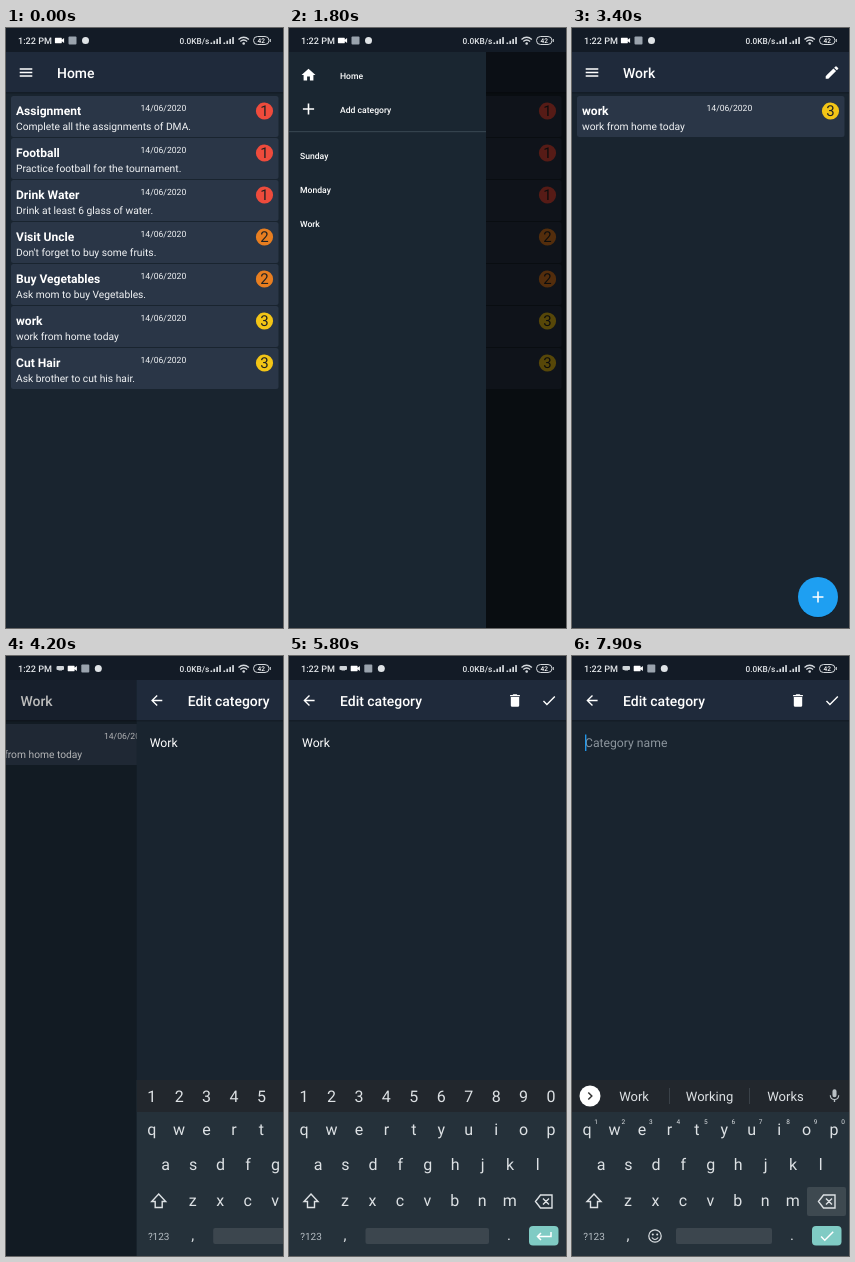
Write an HTML page that moves like this. It is 277 px wide and 600 px high and loops after 8000 ms.

```html
<!DOCTYPE html>
<html lang="en">
<head>
<meta charset="utf-8">
<title>To-do app demo</title>
<style>
html, body { margin: 0; width: 100%; height: 100%; overflow: hidden; background: #19242f; }
svg { display: block; width: 100%; height: 100%; font-family: Roboto, "Noto Sans", sans-serif; text-rendering: geometricPrecision; }
</style>
</head>
<body>
<svg id="stage" viewBox="0 0 277 600"></svg>
<script>
const LOOP = 8000, W = 277, DRAWER = 197;
const BG = '#19242f', BAR = '#1f2a3b', CARD = '#2a3647', KEY = '#dde1e4';

// Markup helpers
const rect = (x, y, w, h, fill, r = 0, extra = '') =>
  `<rect x="${x}" y="${y}" width="${w}" height="${h}" rx="${r}" fill="${fill}" ${extra}/>`;
const circle = (x, y, r, fill) => `<circle cx="${x}" cy="${y}" r="${r}" fill="${fill}"/>`;
const text = (s, x, y, size, { fill = '#fff', weight = 400, anchor = 'start', id = '' } = {}) =>
  `<text x="${x}" y="${y}" font-size="${size}" font-weight="${weight}" fill="${fill}" text-anchor="${anchor}" ${id && `id="${id}"`}>${s}</text>`;
const line = (d, color = '#fff', w = 1.5) =>
  `<path d="${d}" fill="none" stroke="${color}" stroke-width="${w}"/>`;
// Icon on a 24-unit grid centred at x, y
const icon = (d, x, y, scale = 0.7, fill = '#fff') =>
  `<path transform="translate(${x} ${y}) scale(${scale}) translate(-12 -12)" d="${d}" fill="${fill}"/>`;
const group = (id, body) => `<g id="${id}">${body}</g>`;
const mid = (s, x, y, size, fill = KEY) => text(s, x, y, size, { fill, anchor: 'middle' });

const ICONS = {
  menu: 'M3 18h18v-2H3zM3 13h18v-2H3zM3 6v2h18V6z',
  pencil: 'M3 17.2V21h3.8L17.8 9.9l-3.7-3.7zM20.7 7a1 1 0 0 0 0-1.4l-2.3-2.3a1 1 0 0 0-1.4 0l-1.9 1.8 3.8 3.8z',
  home: 'M10 20v-6h4v6h5v-8h3L12 3 2 12h3v8z',
  trash: 'M6 19a2 2 0 0 0 2 2h8a2 2 0 0 0 2-2V7H6zM19 4h-3.5l-1-1h-5l-1 1H5v2h14z',
  back: 'M20 11H7.8l5.6-5.6L12 4l-8 8 8 8 1.4-1.4L7.8 13H20z',
  check: 'M9 16.2 4.8 12l-1.4 1.4L9 19 21 7l-1.4-1.4z',
  plus: 'M19 13h-6v6h-2v-6H5v-2h6V5h2v6h6z',
  camera: 'M17 10.5V7a1 1 0 0 0-1-1H3a1 1 0 0 0-1 1v10a1 1 0 0 0 1 1h13a1 1 0 0 0 1-1v-3.5l5 4v-11z',
  mic: 'M12 14a3 3 0 0 0 3-3V5a3 3 0 0 0-6 0v6a3 3 0 0 0 3 3zM17.3 11a5.3 5.3 0 0 1-10.600 0H5a7 7 0 0 0 6 6.9V21h2v-3.1a7 7 0 0 0 6-6.9z',
};

const tasks = [
  ['Assignment', 'Complete all the assignments of DMA.', 1],
  ['Football', 'Practice football for the tournament.', 1],
  ['Drink Water', 'Drink at least 6 glass of water.', 1],
  ['Visit Uncle', "Don't forget to buy some fruits.", 2],
  ['Buy Vegetables', 'Ask mom to buy Vegetables.', 2],
  ['work', 'work from home today', 3],
  ['Cut Hair', 'Ask brother to cut his hair.', 3],
];
const badgeColors = ['', '#ee4b3c', '#e87e20', '#f3c516'];

const card = ([title, note, level], i) => {
  const y = 68 + 42 * i;
  return rect(5, y, 267.5, 41, CARD, 2.5) +
    text(title, 10, y + 19, 12.05, { weight: 700 }) +
    text(note, 10, y + 33.7, 10.25, { fill: '#f1f3f5' }) +
    text('14/06/2020', 134.5, y + 15.2, 8.6, { fill: '#f1f3f5' }) +
    circle(258.5, y + 15, 8.6, badgeColors[level]) +
    mid(level, 258.5, y + 20.3, 15, '#222');
};

const page = (title, lead) => rect(0, 0, W, 600, BG) + rect(0, 64, W, 1.5, '#141d27') +
  rect(0, 24, W, 40, BAR) + text(title, 51, 49.8, 13.95, { weight: 500 }) + icon(ICONS[lead], 20, 44.5);

const homePage = page('Home', 'menu') + tasks.map(card).join('');
const workPage = page('Work', 'menu') + icon(ICONS.pencil, 260, 44.5) + card(tasks[5], 0) +
  circle(246, 570, 20, '#12202c') + circle(246, 569, 20, '#1e9ff2') + icon(ICONS.plus, 246, 569, 0.78);

const item = (s, x, y) => text(s, x, y, 8.6, { weight: 500 });
const drawer = rect(0, 0, DRAWER, 600, '#1a2631') +
  icon(ICONS.home, 19.5, 47) + item('Home', 51, 50.5) +
  icon(ICONS.plus, 19.5, 81, 0.8) + item('Add category', 51, 84.5) +
  rect(0, 103, DRAWER, 1.2, '#34424d') +
  ['Sunday', 'Monday', 'Work'].map((s, i) => item(s, 11, 130.5 + 34 * i)).join('');

// Keyboard
const row = (keys, x, y, size = 16) =>
  [...keys].map((k, i) => mid(k, x + 27.45 * i, y, size)).join('');
const digits = '1234567890';
const enterKey = rect(240, 570, 29.5, 19.5, '#80cbc4', 4);
const spaceKey = x => rect(x, 572, 200 - x, 16, '#3c464e', 2);
const plainKeys = row(digits, 15, 446) + spaceKey(76.5) + enterKey +
  line('M262 576v4.5h-13M252 577l-3.5 3.5 3.5 3.5');
const typingKeys = circle(18, 440, 10.5, '#fff') + line('M16.3 436.5l3.5 3.5-3.5 3.5', '#333') +
  rect(97, 432, 1, 16, '#3a4148') + rect(177, 432, 1, 16, '#3a4148') +
  mid('Work', 62, 445, 13) + mid('Working', 137.5, 445, 13) + mid('Works', 213.5, 445, 13) +
  icon(ICONS.mic, 262.5, 440, 0.68, '#b9c0c5') + row(digits, 24, 468, 6.5) +
  `<circle cx="83" cy="580" r="6.2" fill="none" stroke="${KEY}" stroke-width="1.2"/>` +
  circle(80.8, 578.5, 1, KEY) + circle(85.2, 578.5, 1, KEY) + line('M79.8 581.5q3.2 4 6.4 0', KEY, 1.2) +
  spaceKey(104) + enterKey + icon(ICONS.check, 255, 580, 0.75);
const keyboard = rect(0, 424, W, 176, '#25313a') + rect(0, 424, W, 32, '#22272d') +
  group('deleteGlow', rect(235, 531, 39, 29, '#3e4950', 2)) +
  row('qwertyuiop', 15, 479) + row('asdfghjkl', 29, 514) + row('zxcvbnm', 56, 549.5) +
  line('M22 538l7 7.5h-3.5v6h-7v-6h-3.5z', KEY, 1.4) +
  line('M246.5 545.5l5-6.5h11.5v13h-11.5zM254 542.5l6 6M260 542.5l-6 6', KEY, 1.4) +
  mid('?123', 22, 583.5, 10, '#b4bcc2') + mid(',', 56, 584, 15) + mid('.', 220, 584, 15) +
  group('plainKeys', plainKeys) + group('typingKeys', typingKeys);

const editPage = page('Edit category', 'back') +
  icon(ICONS.trash, 226, 44.5) + icon(ICONS.check, 260, 44.5) +
  text('Category name', 13, 91, 12.2, { fill: '#8c959d', id: 'hint' }) +
  text('Work', 13, 91, 12.2, { id: 'field' }) +
  rect(0, 78.5, 1.4, 16.5, '#2196e8', 0, 'id="caret"') + keyboard;

// Status bar
const bars = x => [0, 1, 2, 3].map(i => rect(x + 2.9 * i, 14.5 - 1.8 * i, 1.7, 1.5 + 1.8 * i, '#d5d9dd')).join('');
const statusBar = rect(0, 0, W, 24, '#131b26') +
  text('1:22 PM', 12, 16, 9.1, { weight: 500, fill: '#e4e7ea' }) +
  group('keyIcon', rect(50.5, 10, 7.5, 4, '#cfd4d8', 1) + rect(52.5, 13, 3.5, 1.5, '#cfd4d8')) +
  group('notices', icon(ICONS.camera, 53.5, 12.5, 0.46) + rect(62.5, 8.5, 8, 8, '#9aa3ad', 1) +
    circle(79.5, 12.5, 3.5, '#dfe3e6')) +
  text('0.0KB/s', 173.5, 16, 8.3, { weight: 500, fill: '#e4e7ea' }) + bars(204.5) + bars(217.5) +
  line('M232.5 11.5q5.2-4.6 10.4 0M234.3 13.5q3.4-3 6.8 0', '#d5d9dd', 1.3) +
  circle(237.7, 15.5, 1.3, '#d5d9dd') +
  `<rect x="247.5" y="8.5" width="15.5" height="8" rx="4" fill="none" stroke="#d5d9dd"/>` +
  rect(263.8, 11, 1, 3, '#d5d9dd') +
  text('42', 255.2, 15, 6.5, { weight: 500, anchor: 'middle' });

stage.innerHTML =
  group('under', group('home', homePage) + group('work', workPage)) +
  rect(0, 0, W, 600, '#000', 0, 'id="dim"') + group('drawer', drawer) +
  group('edit', editPage) + statusBar;

const $ = id => document.getElementById(id);
const show = (id, on) => $(id).setAttribute('display', on ? 'inline' : 'none');
const shift = (id, x) => $(id).setAttribute('transform', `translate(${x} 0)`);
const easeOut = (t, from, to, power) =>
  1 - (1 - Math.min(1, Math.max(0, (t - from) / (to - from)))) ** power;

function draw(time) {
  const t = Math.floor(time % LOOP / 100) * 100;
  const open = easeOut(t, 1000, 1500, 2.14) - easeOut(t, 2400, 2900, 2.14);
  const slide = easeOut(t, 4100, 4700, 4.12);
  const editing = slide > 0, typing = t >= 6600;

  show('home', t < 2500);
  show('work', t >= 2500);
  shift('under', -W / 4 * slide);
  $('dim').setAttribute('opacity', 0.64 * open ** 1.7 + 0.5 * slide);
  show('drawer', open > 0);
  shift('drawer', DRAWER * (open - 1));
  show('edit', editing);
  shift('edit', W * (1 - slide));

  const erased = t < 7100 ? 0 : t < 7400 ? 1 : Math.min(4, 2 + (t - 7400) / 100);
  const value = 'Work'.slice(0, 4 - erased);
  $('field').textContent = value;
  show('hint', !value);
  show('caret', typing);
  if (typing) $('caret').setAttribute('x', 13 + (value ? $('field').getComputedTextLength() : 0));
  show('deleteGlow', t >= 7100);
  show('plainKeys', !typing);
  show('typingKeys', typing);

  show('keyIcon', editing);
  shift('notices', editing ? 12.8 : 0);
}

const start = performance.now();
(function tick() {
  draw(performance.now() - start);
  requestAnimationFrame(tick);
})();
</script>
</body>
</html>
```
